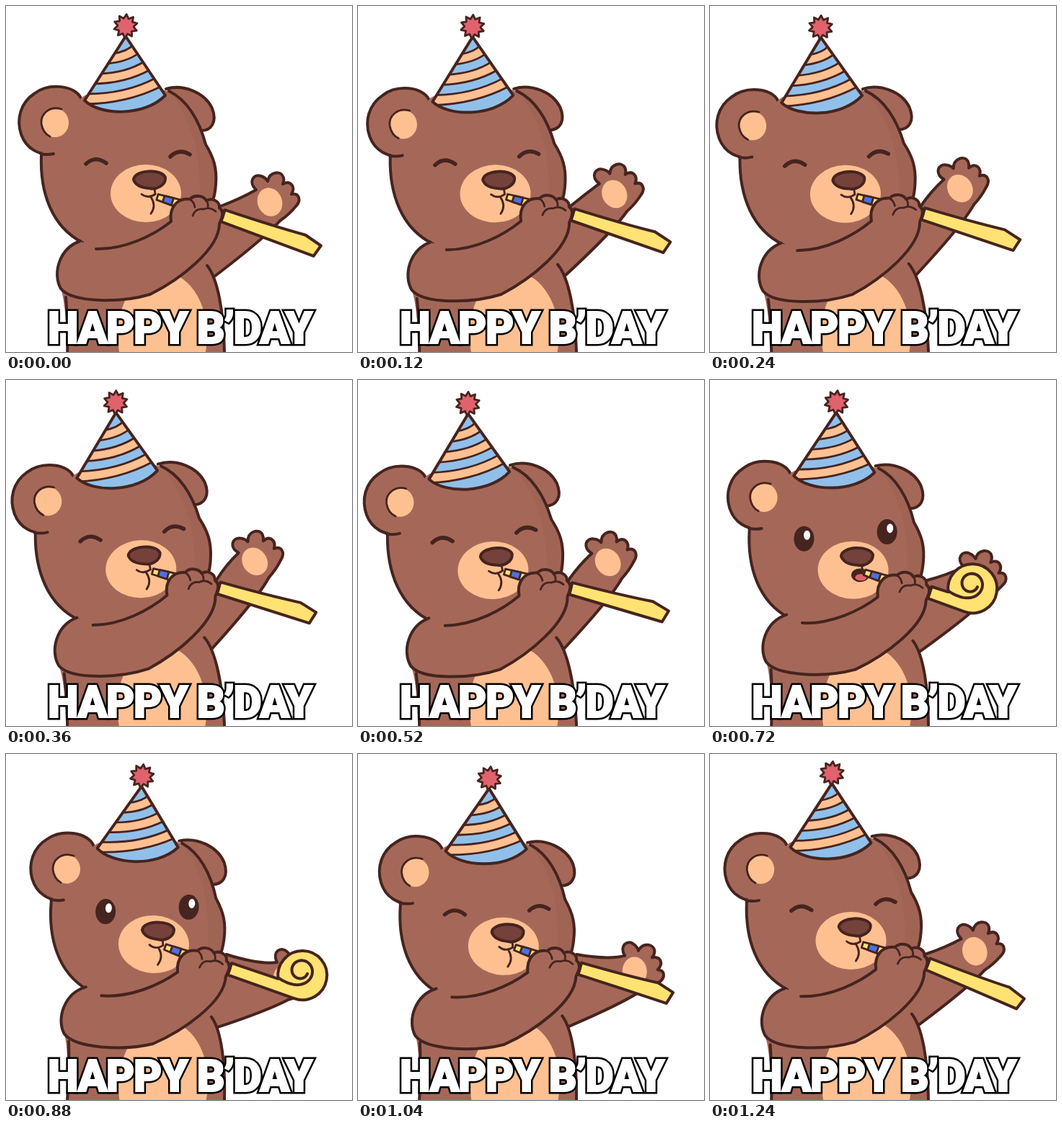
Write an HTML page that moves like this. It is 480 px wide and 480 px high and loops after 1.28 s.

```html
<!DOCTYPE html>
<html lang="en">
<head>
<meta charset="utf-8">
<title>Happy B’day</title>
<style>
  html, body { margin: 0; width: 100%; height: 100%; overflow: hidden; background: #fff; }
  svg { display: block; width: 100%; height: 100%; }
  .line { fill: none; stroke: #46241f; stroke-width: 4; stroke-linecap: round; stroke-linejoin: round; }
  .thin { stroke-width: 2.8; }
  .bold { stroke-width: 5.5; }
  .fur { fill: #a56858; }
  .skin { fill: #ffc091; }
  .dark { fill: #46241f; }
  .nose { fill: #74423a; }
  .blue { fill: #90c0ea; }
  .band { fill: #4a72e0; }
  .paper { fill: #ffe272; }
  .red { fill: #e0626c; }
  #caption {
    font-weight: 900; font-stretch: extra-condensed; letter-spacing: -0.025em; text-anchor: middle;
    fill: #fff; stroke-linejoin: miter; stroke-miterlimit: 3;
  }
  .rim { stroke: #000; stroke-width: 7; }
  .face { stroke: #fff; stroke-width: 2; }
</style>
</head>
<body>
<svg viewBox="0 0 480 480">
  <defs>
    <path id="hatShape" d="M166 42 L109 131 C130 152 192 154 221 124 Z"/>
    <path id="headShape" d="M104 128 C120 112 205 108 226 119 C251 130 268 158 277 192 C288 210 293 225 291 248 Q290 262 285 275 L228 300 C190 335 150 336 107 327 C62 306 46 258 49 205 Z"/>
    <clipPath id="hatClip"><use href="#hatShape"/></clipPath>
    <clipPath id="headClip"><use href="#headShape"/></clipPath>
  </defs>

  <path id="limbFill" class="fur"/>
  <path id="limbLine" class="line"/>
  <g id="paw">
    <path class="line fur" d="M347 255 C335 244 344 232 354 236 Q360 238 363 243 C366 229 382 228 385 238 Q386 243 384 247 C395 241 402 251 396 261 C407 259 410 270 402 278 Q392 290 380 298"/>
    <ellipse class="skin" cx="366" cy="272" rx="17" ry="20" transform="rotate(-20 366 272)"/>
  </g>

  <g id="lean">
    <path class="fur" d="M103 326 C74 338 64 372 76 392 Q85 420 85 500 H303 C304 430 298 384 279 360 L290 300 L225 290 Z"/>
    <ellipse class="skin" cx="217" cy="457" rx="62" ry="88"/>
    <path class="line" d="M279 360 C292 376 304 420 303 500 M83 404 Q86 440 85 500"/>

    <g id="head">
      <path class="line fur" d="M222 115 C246 108 276 120 286 142 C293 160 286 174 268 173"/>
      <path class="line fur" d="M104 128 C96 110 60 106 40 121 C20 134 14 157 21 178 C28 198 46 208 66 205"/>
      <use href="#headShape" class="fur"/>
      <path d="M228 120 C258 160 272 205 268 275 L300 280 V120 Z" fill="#a06455" clip-path="url(#headClip)"/>
      <path class="line" d="M226 118 C251 130 268 158 277 192 C288 210 293 225 291 248 Q290 262 286 273 M49 207 C47 258 63 306 106 328"/>
      <path class="line" d="M48 205 Q57 207 66 205"/>
      <ellipse class="skin" cx="68" cy="162" rx="19" ry="20"/>
      <path class="line thin" d="M77 143 C60 138 48 150 49 163 Q51 176 61 181"/>

      <ellipse class="skin" cx="194" cy="260" rx="49" ry="40"/>
      <path class="line nose" d="M177 241 C178 227 216 225 221 238 C222 249 208 255 200 253 Q181 252 177 241 Z"/>
      <path class="line thin" d="M206 253 L207 261"/>
      <g id="mouthOpen">
        <ellipse class="line thin dark" cx="204" cy="267" rx="11" ry="8"/>
        <ellipse class="red" cx="205" cy="270" rx="8" ry="4.5"/>
      </g>
      <path id="mouthShut" class="line thin" d="M188 261 Q197 268 207 261 M201 265 Q209 277 201 288"/>

      <path id="eyesShut" class="line bold" d="M111 219 Q124 207 139 218 M228 209 Q240 197 255 206"/>
      <g id="eyesOpen">
        <ellipse cx="125" cy="218" rx="14" ry="17.5" class="dark"/>
        <ellipse cx="240" cy="206" rx="14" ry="17.5" class="dark"/>
        <ellipse cx="129" cy="213" rx="4.5" ry="6.5" fill="#fff"/>
        <ellipse cx="244" cy="201" rx="4.5" ry="6.5" fill="#fff"/>
      </g>

      <use href="#hatShape" class="blue"/>
      <g id="stripes" clip-path="url(#hatClip)"></g>
      <use href="#hatShape" class="line"/>
      <path id="star" class="line thin red"/>
    </g>

    <g id="hand">
      <g transform="translate(210 265) rotate(17)">
        <path class="line thin paper" d="M0 -4 L40 -6 V6 L0 4 Z"/>
        <path class="line thin band" d="M9 -4.5 L22 -5.2 V5.2 L9 4.5 Z"/>
      </g>
      <g id="blower">
        <path id="paper" class="line paper"/>
        <path id="coil" class="line"/>
        <path class="line thin band" d="M-7 -8 Q3 -8 0 8.5 H-7 Z"/>
      </g>
      <path class="fur" d="M125 337 C165 338 205 318 229 299 C226 279 238 266 255 268 C262 261 274 263 278 270 C287 265 297 272 296 280 C303 286 300 293 296 302 C296 338 240 380 200 400 C160 412 92 412 76 392 C68 376 82 340 103 326 Z"/>
      <path class="line" d="M125 337 C165 338 205 318 229 299 C226 279 238 266 255 268 C262 261 274 263 278 270 C287 265 297 272 296 280 C303 286 300 293 296 302 C296 338 240 380 200 400 C160 412 92 412 76 392 C64 371 74 336 103 326"/>
      <path class="line thin" d="M255 268 Q261 272 262 279 M278 270 Q281 274 280 280 M259 291 Q263 280 274 282 M274 282 Q283 278 291 285"/>
    </g>
  </g>

  <g id="caption">
    <text class="rim" x="241" y="468">HAPPY B’DAY</text>
    <text class="face" x="241" y="468">HAPPY B’DAY</text>
  </g>
</svg>

<script>
const LOOP = 1280, STEP = 40;
const $ = id => document.getElementById(id);

// [time, lean, head bob, back arm, paper tilt, paper reach]
const poses = [
  [0, 0, 0, 0, 0, 1],
  [240, -1.6, 0.8, -12.5, -0.4, 0.98],
  [520, -1.75, 4, -12.6, -2.3, 0.98],
  [560, -1.8, 4, -11, -2.4, 0.98],
  [720, 1.2, 3.5, 3, -1.2, 0.96],
  [880, 2.9, 3.5, 21, -2.9, 0.95],
  [1040, 2.1, 6.5, 16, -4.6, 0.94],
  [1140, 1.25, -2, 6, 0, 0.98],
  [1240, 0.4, -1, 1, 2.4, 1]
];
// [time, distance from the grip to the middle of the roll]
const rolls = [[600, 98], [660, 72], [720, 54], [800, 58], [880, 98], [920, 104]];

// Smooth periodic curve through one column of the poses, flat at its turning points
function curve(t, col) {
  const n = poses.length;
  const key = i => {
    const p = poses[(i + n) % n];
    return [p[0] + Math.floor(i / n) * LOOP, p[col]];
  };
  const slope = i => {
    const [a, b, c] = [key(i - 1), key(i), key(i + 1)];
    const turns = (b[1] - a[1]) * (c[1] - b[1]) <= 0;
    return turns ? 0 : (c[1] - a[1]) / (c[0] - a[0]);
  };
  let i = n - 1;
  while (poses[i][0] > t) i--;
  const [t0, v0] = key(i), [t1, v1] = key(i + 1);
  const d = t1 - t0, u = (t - t0) / d, w = 1 - u;
  return w * w * (1 + 2 * u) * v0 + u * u * (3 - 2 * u) * v1
    + d * u * w * (w * slope(i) - u * slope(i + 1));
}

function rollAt(t) {
  const i = rolls.findIndex(r => r[0] >= t);
  if (i < 1) return rolls[0][1];
  const [a, b] = [rolls[i - 1], rolls[i]];
  return a[1] + (b[1] - a[1]) * (t - a[0]) / (b[0] - a[0]);
}

const polar = (cx, cy, r, a) =>
  `${(cx + r * Math.cos(a)).toFixed(1)} ${(cy + r * Math.sin(a)).toFixed(1)}`;

function drawHat() {
  const edge = i => {
    const yl = 66 + 14 * i, yr = 54 + 11.5 * i;
    const xl = 166 - (yl - 42) * 0.65, xr = 166 + (yr - 42) * 0.68;
    return { l: `${xl - 2} ${yl}`, r: `${xr + 2} ${yr}`, c: `${(xl + xr) / 2 + 6} ${(yl + yr) / 2 + 3 + 2 * i}` };
  };
  let out = '';
  for (let i = 0; i < 6; i += 2) {
    const a = edge(i), b = edge(i + 1);
    out += `<path class="line thin" style="fill:#ffc091" d="M${a.l} Q${a.c} ${a.r} L${b.r} Q${b.c} ${b.l} Z"/>`;
  }
  $('stripes').innerHTML = out;
  const points = Array.from({ length: 20 }, (_, i) => polar(166, 28, i % 2 ? 11 : 16.5, i * Math.PI / 10 - 1.5));
  $('star').setAttribute('d', 'M' + points.join('L') + 'Z');
}

// The shoulder stays on the body while the wrist swings round it
function drawBackArm(angle, lean) {
  const a = angle * Math.PI / 180;
  const swing = (x, y) => polar(270, 350, Math.hypot(x - 270, y - 350), Math.atan2(y - 350, x - 270) + a);
  const top = `${297 + lean * 3} 278`, bottom = `${288 + lean * 2} ${376 + lean}`;
  const upper = `M${top} Q${swing(326, 267)} ${swing(347, 255)}`;
  const under = `${swing(380, 298)} Q${swing(359, 322)} ${bottom}`;
  $('limbFill').setAttribute('d', `${upper} L${swing(368, 270)} L${under} L250 370 V290 Z`);
  $('limbLine').setAttribute('d', `${upper} M${under}`);
  move('paw', `rotate(${angle} 270 350)`);
}

function drawPaper(t, reach) {
  const rolled = t >= 600 && t <= 920;
  if (!rolled) {
    const x = v => v * reach;
    $('paper').setAttribute('d', `M0 -8.5 Q${x(70)} -9 ${x(117)} -12 L${x(142)} -5 L${x(137)} 12 Q${x(70)} 10 0 8.5 Z`);
    $('coil').setAttribute('d', '');
    return;
  }
  const x = rollAt(t);
  $('paper').setAttribute('d', `M0 8.5 L${x} 9.5 A34 34 0 1 0 ${x - 30} -9 L0 -8.5 Z`);
  const coil = [];
  for (let u = 0; u <= 1.4; u += 0.03) {
    const r = 20 * Math.exp(-0.5 * u) + 13 * Math.exp(-12 * u);
    coil.push(polar(x - 4, -30, r, 2.5 - u * 2 * Math.PI));
  }
  $('coil').setAttribute('d', 'M' + coil.join('L'));
}

function show(id, on) { $(id).style.display = on ? '' : 'none'; }
function move(id, value) { $(id).setAttribute('transform', value); }

function draw(t) {
  const [lean, bob, arm, tilt, reach] = [1, 2, 3, 4, 5].map(col => curve(t, col));
  move('lean', `rotate(${lean} 190 480)`);
  move('head', `translate(0 ${bob})`);
  move('hand', `translate(0 ${bob * 0.4})`);
  move('blower', `translate(301 291) rotate(${19 + tilt})`);
  drawBackArm(arm, lean);
  drawPaper(t, reach);
  const awake = t >= 600 && t < 940, gasp = t >= 640 && t < 840;
  show('eyesOpen', awake);
  show('eyesShut', !awake);
  show('mouthOpen', gasp);
  show('mouthShut', !gasp);
}

// Choose the narrowest face, at the largest size that keeps the caption on its line
function sizeCaption() {
  const box = $('caption'), text = box.querySelector('text');
  const measure = font => {
    box.style.font = `900 extra-condensed 80px ${font}, sans-serif`;
    return text.getComputedTextLength();
  };
  const fonts = ['"Noto Sans"', '"Open Sans"', 'Roboto'];
  const best = fonts.map(font => ({ font, width: measure(font) })).sort((a, b) => a.width - b.width)[0];
  measure(best.font);
  box.style.fontSize = Math.min(76, 80 * 366 / best.width) + 'px';
}

drawHat();
sizeCaption();
const start = performance.now();
function tick() {
  const t = (performance.now() - start) % LOOP;
  draw(Math.floor(t / STEP) * STEP);
  requestAnimationFrame(tick);
}
tick();
</script>
</body>
</html>
```
